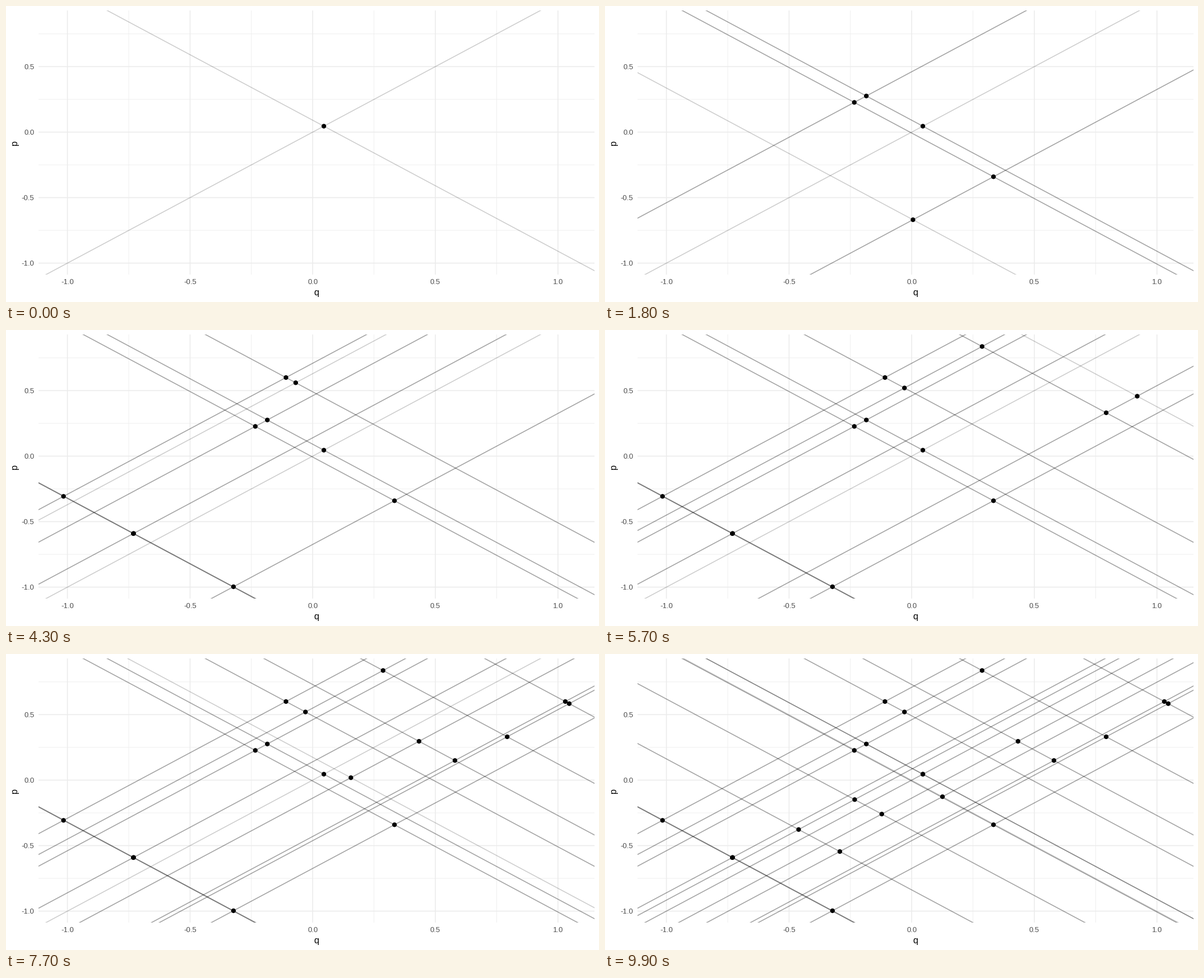
Write a matplotlib script that moves like this. It is 1058 by 529 pixels and loops after 10000 ms.

```python
import numpy as np
import matplotlib.pyplot as plt
from matplotlib.animation import FuncAnimation
from matplotlib.collections import LineCollection

plt.rcParams["font.family"] = "Liberation Sans"

W, H, DPI = 1058, 529, 64
PX = 72 / DPI  # points per pixel
LEFT, RIGHT, TOP, BOTTOM = 57.5, 1050, 8, 480.3
FRAMES = 100

# Key levels of the walk: each one replaces, in turn, p - q or p + q.
LEVELS = [0, 0.091, 0.461, -0.007, -0.674, -1.320, 0.140, -1.323,
          0.709, 0.491, 0.550, 1.124, -0.462, 1.630, -0.430, 0.730,
          -0.137, -0.381, 0.084, -0.838, -0.252, -0.001]


def walk(levels):
    """Points (q, p) visited when the two diagonals change alternately."""
    points = []
    for k, pair in enumerate(zip(levels, levels[1:])):
        diff, total = pair if k % 2 == 0 else pair[::-1]
        points.append(((total - diff) / 2, (total + diff) / 2))
    return np.array(points)


def move_frames(count):
    """A move every five frames, with one shorter rest midway and short rests at the end."""
    k = np.arange(count)
    return 3 + 5 * k - (k >= 10) - np.maximum(0, k - 16)


def expanded(values, share=0.05):
    low, high = values.min(), values.max()
    pad = share * (high - low)
    return low - pad, high + pad


def visible_points(frame):
    moves = np.count_nonzero(MOVES <= frame)
    current = STATES[moves % len(STATES)]
    if frame in MOVES:
        current = (STATES[moves - 1] + current) / 2
    return np.vstack([STATES[:moves], current])


def crossing_lines(points, reach=4):
    return [[(q - reach, p - slope * reach), (q + reach, p + slope * reach)]
            for q, p in points for slope in (1, -1)]


def label(x, y, text, size, color, **kwargs):
    fig.text(x / W, 1 - y / H, text, fontsize=size * PX, color=color,
             va="baseline", **kwargs)


STATES = walk(LEVELS)
MOVES = move_frames(len(STATES))

fig = plt.figure(figsize=(W / DPI, H / DPI), dpi=DPI, facecolor="white")
ax = fig.add_axes([LEFT / W, 1 - BOTTOM / H, (RIGHT - LEFT) / W, (BOTTOM - TOP) / H])
ax.axis("off")
xlim, ylim = expanded(STATES[:, 0]), expanded(STATES[:, 1])
ax.set(xlim=xlim, ylim=ylim)


def to_px(q, p):
    x = np.interp(q, xlim, (LEFT, RIGHT))
    y = np.interp(p, ylim, (BOTTOM, TOP))
    return x, y


def grid(values, width):
    style = dict(color="#EBEBEB", lw=width * PX, snap=False, zorder=0)
    for v in values:
        ax.axvline(v, **style)
        if v < ylim[1]:
            ax.axhline(v, **style)


ticks = np.arange(-1, 1.1, 0.5)
grid(ticks[:-1] + 0.25, 0.78)
grid(ticks, 1.57)

for v in ticks:
    x, y = to_px(v, v)
    label(x, 497, f"{v:.1f}", 13.1, "#4D4D4D", ha="center")
    if v < ylim[1]:
        label(50.2, y + 4.6, f"{v:.1f}", 13.1, "#4D4D4D", ha="right")

label((LEFT + RIGHT) / 2, 517, "q", 16.1, "black", ha="center")
label(20, (TOP + BOTTOM) / 2, "p", 16.1, "black", ha="center",
      rotation=90, rotation_mode="anchor")

lines = LineCollection([], colors=[(0, 0, 0, 0.2)], linewidths=1.57 * PX, zorder=2)
ax.add_collection(lines, autolim=False)
dots = ax.scatter([], [], s=(8.3 * PX) ** 2, color="black", linewidths=0,
                  snap=False, zorder=3)
dots.set_antialiased([True, True])  # keeps markers off the whole-pixel grid


def update(frame):
    points = visible_points(frame)
    lines.set_segments(crossing_lines(points))
    dots.set_offsets(points)
    return lines, dots


anim = FuncAnimation(fig, update, frames=FRAMES, interval=100,
                     repeat=True, repeat_delay=0)
plt.show()
```
